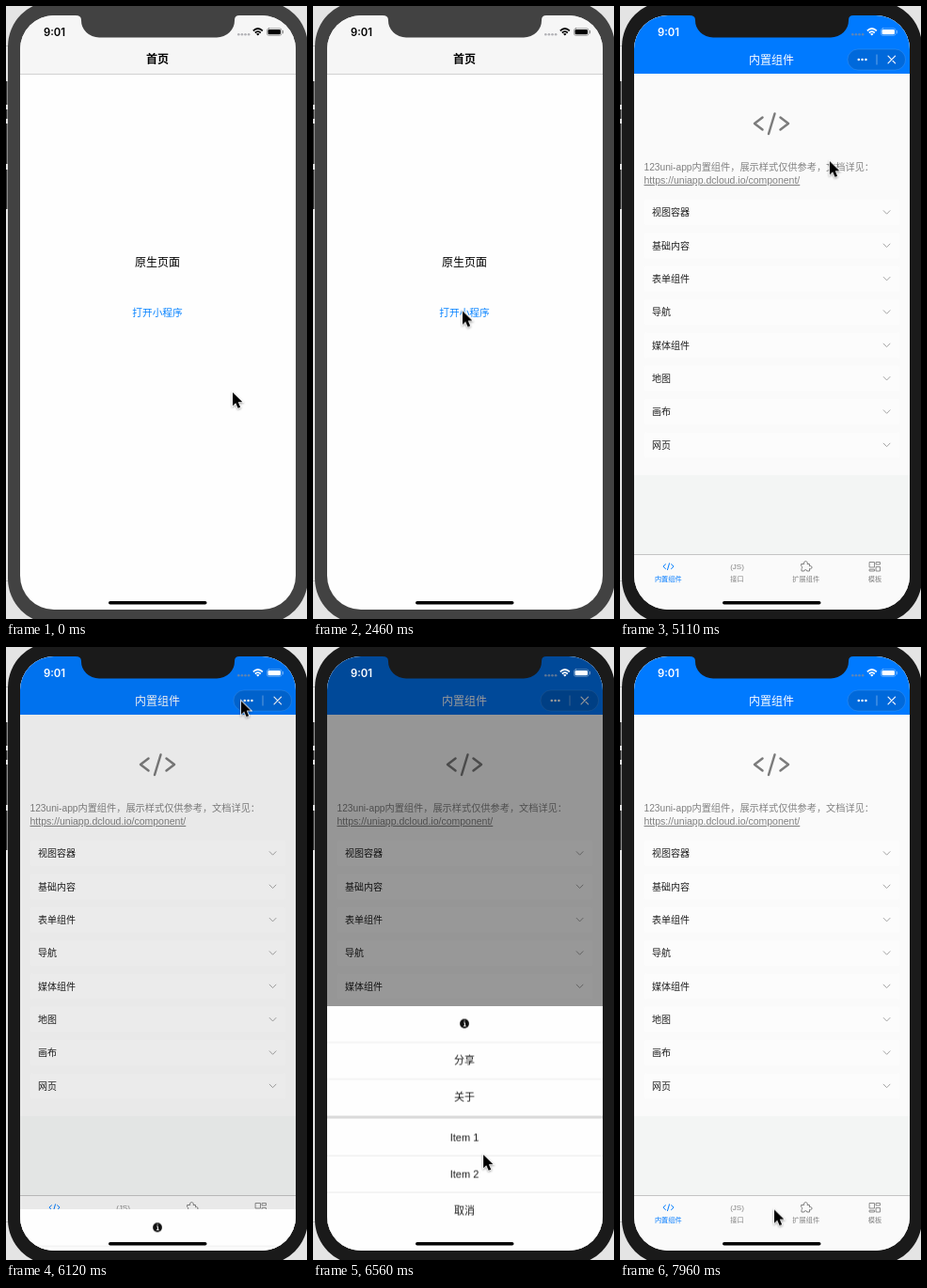
These frames come from a looping animation (320x652 px, 8 s). An HTML page:

```html
<!DOCTYPE html>
<html lang="zh-CN">
<head>
<meta charset="utf-8">
<title>小程序</title>
<style>
  html, body { margin: 0; width: 100%; height: 100%; overflow: hidden; background: #e4e4e4; }
  svg { display: block; width: 100%; height: 100%; }
  text { font: 12px "Liberation Sans", "Noto Sans CJK SC", "Noto Sans CJK", sans-serif; }
  .mid { text-anchor: middle; }
  .bold { font-weight: 600; }
  .line { fill: none; stroke: currentColor; stroke-linecap: round; stroke-linejoin: round; }
  .note { font-size: 10.2px; fill: #808080; }
  .url { font-size: 10.5px; text-decoration: underline; }
  .row { font-size: 10px; font-weight: 500; fill: #1c1c1c; }
  .tab { font-size: 7.2px; fill: currentColor; }
  .item { font-size: 11px; fill: #1c1c1c; }

  .bezel, .status, .app, .splash, .scrim, .sheet, .cursor { animation: 8s linear infinite; }
  .bezel { animation-name: focus; }
  .status { animation-name: status; }
  .app { animation-name: present; }
  .splash { animation-name: splash; }
  .scrim { animation-name: dim; }
  .sheet { animation-name: sheet; }
  .cursor { animation-name: point; }

  @keyframes focus {
    0%, 31.24% { fill: #424242; }
    31.25%, 100% { fill: #1a1a1a; }
  }
  @keyframes status {
    0%, 42.25% { color: #000; }
    44%, 100% { color: #fff; }
  }
  @keyframes present {
    0%, 34.75% { transform: translateY(642px); animation-timing-function: cubic-bezier(.2, .8, .2, 1); }
    40.75%, 100% { transform: none; }
  }
  @keyframes splash {
    0%, 42.1% { opacity: 1; }
    45.875%, 100% { opacity: 0; }
  }
  @keyframes dim {
    0%, 76.1% { opacity: 0; }
    76.5% { opacity: .065; }
    79% { opacity: .33; }
    81%, 96.875% { opacity: .4; }
    99.5%, 100% { opacity: 0; }
  }
  @keyframes sheet {
    0%, 76.1% { transform: translateY(642px); }
    76.5% { transform: translateY(600px); animation-timing-function: cubic-bezier(.2, .6, .4, 1); }
    81.5% { transform: translateY(380px); animation-timing-function: ease-in-out; }
    83.375%, 96.875% { transform: translateY(390px); animation-timing-function: ease-in; }
    99.5%, 100% { transform: translateY(642px); }
  }
  @keyframes point {
    0%, 7.4% { transform: translate(241px, 411px); animation-timing-function: ease-in-out; }
    17.5%, 18.2% { transform: translate(165px, 329px); animation-timing-function: ease-out; }
    20.125%, 54% { transform: translate(159px, 324.5px); animation-timing-function: ease-in-out; }
    64.125%, 64.4% { transform: translate(223px, 165px); animation-timing-function: ease-in-out; }
    71.375%, 76.8% { transform: translate(250px, 57.5px); animation-timing-function: ease-in-out; }
    82% { transform: translate(181px, 539px); animation-timing-function: ease-out; }
    83.375%, 85.9% { transform: translate(186px, 601px); animation-timing-function: ease-in-out; }
    87.5% { transform: translate(193px, 603px); animation-timing-function: ease-in-out; }
    91% { transform: translate(158px, 600px); animation-timing-function: ease-in-out; }
    92.875%, 100% { transform: translate(164px, 598.5px); }
  }
</style>
</head>
<body>
<svg viewBox="0 0 320 652">
  <defs>
    <clipPath id="screen"><rect x="15" y="10" width="293" height="632" rx="36"/></clipPath>
  </defs>

  <!-- window edge and side buttons -->
  <path d="M0 42.5H3M0 611.5H3" stroke="#bbb"/>
  <path d="M.5 80V105M.5 110V120M.5 125V168M.5 174V216" stroke="#333" stroke-width="2"/>
  <rect class="bezel" x="2" y="-5" width="319" height="662" rx="48"/>

  <g clip-path="url(#screen)">
    <!-- native page -->
    <rect x="15" y="10" width="293" height="632" fill="#fefefe"/>
    <rect x="15" y="10" width="293" height="62" fill="#f6f6f6"/>
    <path d="M15 72.5H308" stroke="#d2d2d2"/>
    <text class="mid bold" x="161" y="56.5">首页</text>
    <text class="mid" x="161" y="272.5">原生页面</text>
    <text class="mid" x="161" y="326" fill="#0a84ff" style="font-size:10.7px">打开小程序</text>

    <g class="app">
      <rect x="15" y="10" width="293" height="632" fill="#f3f5f4"/>
      <rect x="15" y="72" width="293" height="427" fill="#fafafa"/>
      <rect x="15" y="10" width="293" height="62" fill="#007aff"/>
      <text class="mid" x="161" y="57" fill="#fff">内置组件</text>
      <rect x="242" y="46" width="61.5" height="22" rx="11" fill="#000" fill-opacity=".14" stroke="#fff" stroke-opacity=".2" stroke-width=".6"/>
      <g fill="#fff">
        <circle cx="253.8" cy="57" r="1.3"/><circle cx="257.6" cy="57" r="1.3"/><circle cx="261.4" cy="57" r="1.3"/>
      </g>
      <path d="M273 51.5V62.5" stroke="#fff" stroke-opacity=".5" stroke-width=".8"/>
      <path d="M285 53.2l7.6 7.6m0-7.6l-7.6 7.6" class="line" color="#fff" stroke-width="1.1"/>

      <path class="line" color="#7c7c7c" stroke-width="2.5" d="M151.5 118.5L143 125l8.5 6.5M164.5 114.5l-6.5 21.5M170.5 118.5L179 125l-8.5 6.5"/>
      <text class="note" x="25.5" y="171">123uni-app内置组件，展示样式仅供参考，文档详见：</text>
      <text class="note url" x="25.5" y="185">https://uniapp.dcloud.io/component/</text>
      <g id="rows"></g>

      <rect x="15" y="583" width="293" height="59" fill="#fafafa"/>
      <path d="M15 583.5H308" stroke="#c4c4c4"/>
      <g color="#007aff">
        <path class="line" d="M48.5 593.8l-2.6 2.4 2.6 2.4M52.5 592.8l-2 6.8M54.5 593.8l2.6 2.4-2.6 2.4"/>
        <text class="tab mid" x="51.3" y="609.5">内置组件</text>
      </g>
      <g color="#808080">
        <text class="tab mid" x="124.5" y="596" style="font-size:8px">(JS)</text>
        <text class="tab mid" x="124.5" y="609.5">接口</text>
        <path class="line" d="M193 593.5h2.8a1.9 1.9 0 1 1 3.2 0h2.5v2.3a1.6 1.6 0 1 1 0 2.6v2.6h-2.8a1.4 1.4 0 0 0-2.8 0H193v-2.6a1.5 1.5 0 0 0 0-2.6z"/>
        <text class="tab mid" x="197.7" y="609.5">扩展组件</text>
        <path class="line" stroke-width=".9" d="M265.5 591.5h5v5.5h-5zM272.5 591.5h4v2.5h-4zM272.5 596.5h4v4.5h-4zM265.5 599.2h5v1.8h-5z"/>
        <text class="tab mid" x="271" y="609.5">模板</text>
      </g>
      <rect class="splash" x="15" y="10" width="293" height="632" fill="#fff"/>
    </g>

    <rect class="scrim" x="15" y="10" width="293" height="632"/>
    <g class="sheet">
      <rect x="15" width="293" height="290" fill="#fefefe"/>
      <path d="M15 39H308M15 78H308M15 159.5H308M15 198.5H308" stroke="#ececec"/>
      <rect x="15" y="117" width="293" height="3" fill="#dadada"/>
      <circle cx="161" cy="19" r="4.9" fill="#111"/>
      <path d="M160.2 18h1.2v3.5m-1.5 0h2.8M160.6 16h1" stroke="#fff" fill="none"/>
      <g id="items"></g>
    </g>

    <g class="status">
      <text class="bold" x="40" y="27.5" fill="currentColor" style="font-family:Inter,sans-serif;font-size:11.3px">9:01</text>
      <g fill="#8e8e93" fill-opacity=".65">
        <circle cx="247.3" cy="30.2" r="1.3"/><circle cx="250.9" cy="30.2" r="1.3"/><circle cx="254.5" cy="30.2" r="1.3"/><circle cx="258.1" cy="30.2" r="1.3"/>
      </g>
      <path class="line" stroke-width="1.7" style="stroke-linecap:butt" d="M262.8 26.3q5-4.6 10 0M264.8 28.5q3-2.6 6 0"/>
      <path fill="currentColor" d="M266 29.7q1.8-1.4 3.6 0l-1.8 1.8z"/>
      <rect class="line" x="277.4" y="23.8" width="15.6" height="7.6" rx="2.2" stroke-width=".8" stroke-opacity=".4"/>
      <rect x="278.5" y="24.9" width="13.4" height="5.4" rx="1.3" fill="currentColor"/>
      <path d="M294.4 26.3v2.6" class="line" stroke-opacity=".45"/>
    </g>
    <rect x="109" y="633" width="104.5" height="3.6" rx="1.8"/>
    <path class="bezel" d="M74 9H248V10Q243 10 243 15A19 18 0 0 1 224 33.5H99A19 18 0 0 1 80 15Q80 10 74 10z"/>
  </g>

  <g class="cursor">
    <path d="M0 0V14.2L3.2 11.2 5.6 16.8 8.2 15.7 5.8 10.3H10.4z" stroke="#fff" stroke-width="1.6" paint-order="stroke" style="filter:drop-shadow(0 1px 1px rgba(0,0,0,.35))"/>
  </g>
</svg>
<script>
  const fill = (id, labels, draw) =>
    document.getElementById(id).innerHTML = labels.map(draw).join('');

  fill('rows', ['视图容器', '基础内容', '表单组件', '导航', '媒体组件', '地图', '画布', '网页'], (label, i) => {
    const y = 219.5 + i * 35.35;
    return `<rect x="25.5" y="${y - 13.5}" width="272" height="27" rx="2" fill="#fcfcfc"/>
      <text class="row" x="34" y="${y}">${label}</text>
      <path class="line" color="#999" stroke-width=".9" d="M280.2 ${y - 1.8}l3.4 3.5 3.4-3.5"/>`;
  });

  fill('items', ['分享', '关于', 'Item 1', 'Item 2', '取消'], (label, i) =>
    `<text class="item mid" x="161" y="${58 + i * 39 + (i > 1 ? 3.5 : 0)}">${label}</text>`);

  // Centre every label vertically on its y.
  document.querySelectorAll('text').forEach(t => t.setAttribute('dy', '.38em'));
</script>
</body>
</html>
```
